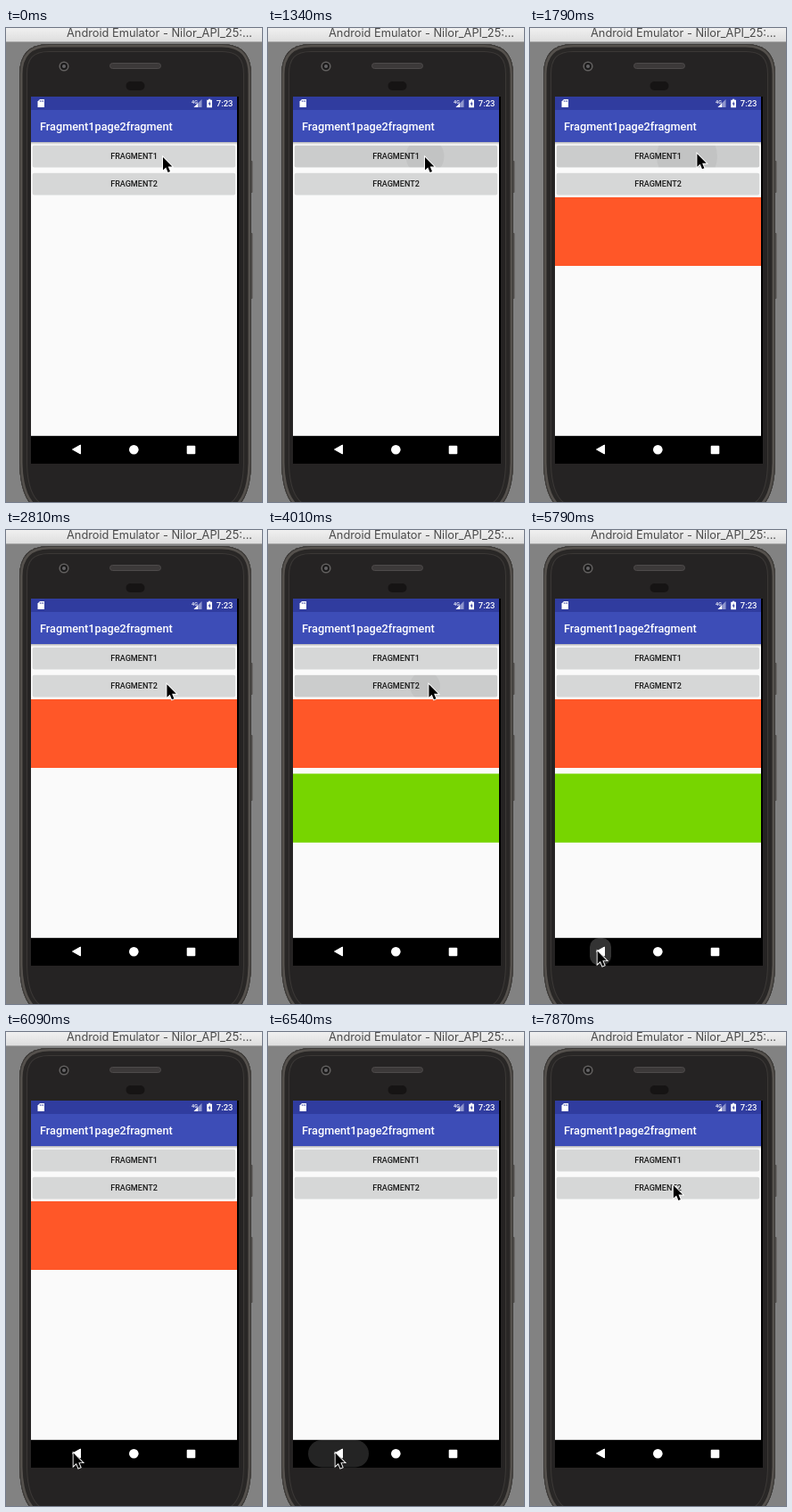
An HTML page that plays this animation: 287x532 px, repeating every 8000 ms.

```html
<!DOCTYPE html>
<html lang="en">
<head>
<meta charset="utf-8">
<title>Fragment demo</title>
<style>
  html, body { margin: 0; width: 100%; height: 100%; overflow: hidden; background: #828282; }
  svg { display: block; width: 287px; height: 532px; }
  .roboto { font-family: Roboto, sans-serif; font-weight: 500; }
  .label { font-size: 9.05px; fill: #1a1a1a; text-anchor: middle; }
</style>
</head>
<body>
<svg viewBox="0 0 287 532">
  <defs>
    <linearGradient id="bar" x2="0" y2="1">
      <stop stop-color="#f0f0f0"/><stop offset="1" stop-color="#dedede"/>
    </linearGradient>
    <linearGradient id="drop" x2="0" y2="1">
      <stop stop-opacity=".28"/><stop offset="1" stop-opacity="0"/>
    </linearGradient>
    <path id="shell" d="M15 52Q15 18 48 18H242Q275 18 275 52V488Q274 546 236 546H54Q16 546 15 488Z"/>
    <clipPath id="inShell"><use href="#shell"/></clipPath>
    <rect id="button" x="29.700" y="131.700" width="227.500" height="24.800" rx="2"/>
    <clipPath id="inButton"><use href="#button"/></clipPath>
  </defs>

  <!-- window -->
  <rect width="287" height="532" fill="#828282"/>
  <rect width="287" height="15" fill="url(#bar)"/>
  <rect y="15" width="287" height="1" fill="#a9a9a9"/>
  <text x="68" y="9.6" font-family="Inter, sans-serif" font-size="12.8" fill="#4a4a4a">Android Emulator - Nilor_API_25:...</text>

  <!-- phone body, rim drawn as nested strokes -->
  <g fill="#555250">
    <rect x="273" y="149" width="3.500" height="36" rx="1"/>
    <rect x="273" y="230" width="3.500" height="74" rx="1"/>
  </g>
  <g clip-path="url(#inShell)" fill="none">
    <use href="#shell" fill="#252323" stroke="#3b3836" stroke-width="18"/>
    <use href="#shell" stroke="#292726" stroke-width="16"/>
    <use href="#shell" stroke="#55514d" stroke-width="7"/>
    <use href="#shell" stroke="#3b3937" stroke-width="2"/>
  </g>
  <circle cx="65" cy="43" r="4.800" fill="#1b1a1a" stroke="#62605f" stroke-width="1.6"/>
  <circle cx="65" cy="43" r="2" fill="#656466"/>
  <rect x="116.500" y="39.500" width="57" height="6" rx="3" fill="#3c3939" stroke="#4d4a4a"/>
  <rect x="134.500" y="60" width="21" height="10" rx="5" fill="#161414"/>

  <!-- screen -->
  <rect x="28" y="77" width="233" height="412" fill="#000"/>
  <rect x="28" y="128" width="231" height="330" fill="#fafafa"/>
  <rect x="28" y="457" width="231" height="1" fill="#c8c8c8"/>
  <rect x="28" y="77" width="231" height="15" fill="#303c9f"/>
  <rect x="28" y="92" width="231" height="36" fill="#3d4db7"/>
  <rect x="28" y="128" width="231" height="3" fill="url(#drop)"/>
  <text class="roboto" x="38" y="115" font-size="12.7" fill="#fff">Fragment1page2fragment</text>

  <!-- status icons -->
  <path d="M38 80H43V89H35.500V82.500Z" fill="#fff"/>
  <path d="M38.300 81.200v1.800M40 81.200v1.800M41.600 81.200v1.800" stroke="#303c9f" stroke-width=".7"/>
  <text class="roboto" x="208" y="84.500" font-size="5.500" fill="#fff">4G</text>
  <path d="M219.500 80V89H210.500Z" fill="#8f96cd"/>
  <path d="M215 84.500V89H210.500Z" fill="#fff"/>
  <path d="M227 79.800H229.200V80.800H231V89.200H225.200V80.800H227Z" fill="#fff"/>
  <path d="M228.600 82L226.700 85.500H228V88L229.700 84.500H228.600Z" fill="#303c9f"/>
  <text class="roboto" x="235.800" y="88.200" font-size="9.5" fill="#fff">7:23</text>

  <!-- content -->
  <g fill="#d6d7d7">
    <use href="#button"/>
    <use href="#button" y="31"/>
  </g>
  <g id="touch">
    <g clip-path="url(#inButton)">
      <use href="#button" opacity=".05"/>
      <circle id="ripple" cx="176" cy="144" opacity=".045"/>
    </g>
  </g>
  <text class="roboto label" x="143.500" y="147">FRAGMENT1</text>
  <text class="roboto label" x="143.500" y="178">FRAGMENT2</text>
  <rect id="orange" x="28" y="190" width="231" height="77" fill="#ff5728"/>
  <rect id="green" x="28" y="273.500" width="231" height="77.300" fill="#77d500"/>

  <!-- navigation -->
  <rect id="pill" y="458" height="30.500" fill="#fff" opacity=".15"/>
  <g fill="#fff">
    <path d="M74.500 473L83.500 468V478Z" stroke="#fff" stroke-linejoin="round"/>
    <circle cx="143.300" cy="473.300" r="5.300"/>
    <rect x="202.700" y="468.700" width="9.600" height="9.600" rx="1"/>
  </g>

  <path id="cursor" d="M0 0V14.500L3.300 11.500L5.600 17L8 16L5.700 10.600H10.400Z"
        stroke="#fff" stroke-width="1.8" paint-order="stroke"/>
</svg>
<script>
const LOOP = 8000, FRAME = 148.6, LEAD = 14;
const HOME = [176, 145];

// Cursor moves: first and last frame, bend point, end point
const moves = [
  { from: 10, to: 12, bend: [181, 144], end: [187.4, 141.2] },
  { from: 14, to: 19, bend: [72, 175], end: [180.4, 173.2] },
  { from: 29, to: 37, bend: [165, 390], end: [75.6, 472.6] },
  { from: 46, to: 53, bend: [170, 85], end: [160.8, 172] }
];

const $ = id => document.getElementById(id);
const set = (id, attrs) => {
  for (const k in attrs) $(id).setAttribute(k, attrs[k]);
};
const show = (id, on) => set(id, { visibility: on ? "visible" : "hidden" });
const within = (n, a, b) => n >= a && n < b;
const smooth = p => p * p * (3 - 2 * p);
const curve = (a, b, c, p) => (1 - p) ** 2 * a + 2 * p * (1 - p) * b + p * p * c;

function cursorAt(n) {
  let pos = HOME;
  for (const { from, to, bend, end } of moves) {
    if (n <= from) break;
    const p = smooth(Math.min(1, (n - from) / (to - from)));
    pos = pos.map((v, i) => curve(v, bend[i], end[i], p));
  }
  return pos;
}

function draw(t) {
  const n = Math.floor((t + LEAD) / FRAME);
  set("cursor", { transform: `translate(${cursorAt(n)})` });

  const first = within(n, 8, 13), second = within(n, 27, 30);
  show("touch", first || second);
  set("touch", { transform: `translate(0 ${second ? 31 : 0})` });
  set("ripple", { r: first ? 34 * Math.sqrt((n - 7) / 5) : 17 });

  const wide = n >= 40;
  const half = wide ? 34 : 12;
  show("pill", within(n, 37, 41) || n === 44);
  set("pill", { x: 79 - half, width: half * 2, rx: wide ? 15 : 10, opacity: wide ? .14 : .2 });

  show("orange", within(n, 10, 44));
  show("green", within(n, 27, 40));
}

const start = performance.now();
function tick() {
  draw((performance.now() - start) % LOOP);
  requestAnimationFrame(tick);
}
tick();
</script>
</body>
</html>
```
